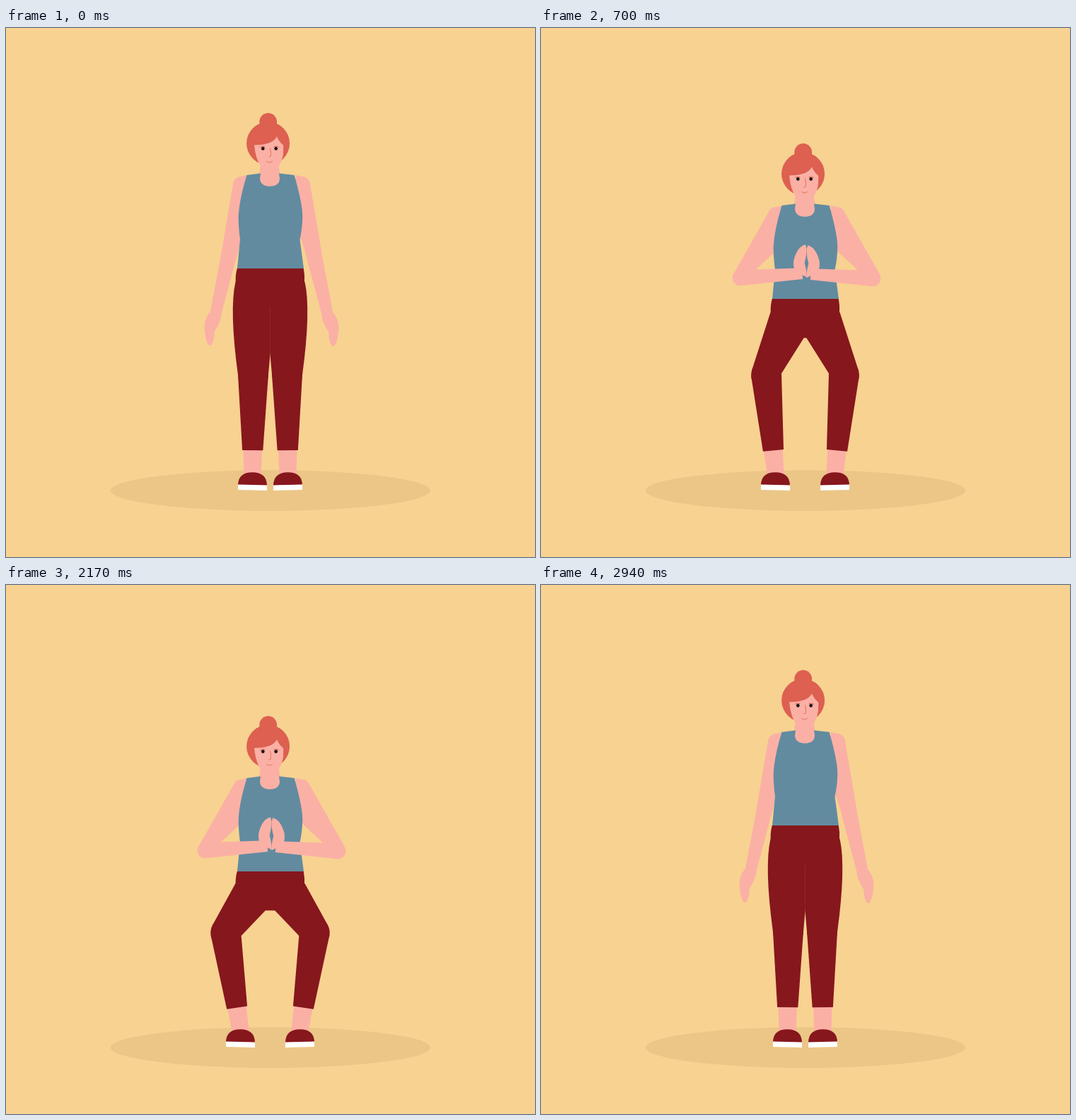
These frames come from a looping animation (748x748 px, 3430 ms). An HTML page:

```html
<!DOCTYPE html>
<html lang="en">
<head>
<meta charset="utf-8">
<title>Squat exercise</title>
<style>
  html, body { margin: 0; width: 100%; height: 100%; overflow: hidden; background: #f7d291; }
  svg { display: block; width: 100vw; height: 100vh; }
  .skin { fill: #fbb0a5; }
  .hair { fill: #dd6050; }
  .pants { fill: #86171d; }
  .line { fill: none; stroke: #dd6050; stroke-width: .8; stroke-linecap: round; }
</style>
</head>
<body>
<svg viewBox="0 0 748 748">
  <rect width="748" height="748" fill="#f7d291"/>
  <ellipse cx="374" cy="654" rx="226" ry="28.7" fill="#ebc687"/>

  <g id="upperBody">
    <g id="upperArm" class="skin">
      <path d="M342 208L333 210L326 214L335 232Z"/>
      <path id="upper" d="M-12 2A12 12 0 0 1 0 -12L20 -8L24 46L14 78L11 102L-11 102Z"/>
    </g>
    <use href="#upperArm" transform="matrix(-1 0 0 1 751 0)"/>
  </g>

  <g id="leg">
    <g id="shank">
      <path class="skin" d="M-13.2 -34H13.2L12 4H-12Z"/>
      <path class="pants" d="M-21.5 -140H21.5L14.6 -32.8H-14.6Z"/>
    </g>
    <circle id="knee" class="pants" r="21.5"/>
    <path id="thigh" class="pants"/>
    <g id="shoe">
      <path class="pants" d="M-20.5 646Q-20 628.3 0 628.3Q20 628.3 20.5 647Z"/>
      <path fill="#fff" d="M-20.5 645.4L20.5 646.4V654L-20.5 653Z"/>
    </g>
  </g>
  <use href="#leg" transform="matrix(-1 0 0 1 747 0)"/>

  <g id="front">
    <path class="pants" d="M327 339.5H420.7Q422.5 348 422 359L384 395.3H363L324.7 359Q324.3 348 327 339.5Z"/>
    <path class="skin" d="M360 190H385L388 210V226H358V210Z"/>
    <path fill="#628ba0" d="M340.5 208L360 205.5L359 213Q360 223.8 373 223.8Q386.500 223.8 387 213L386 205.500L407.700 208Q419 248 419.300 266Q419 284 415.500 299L421 340H327L331 299Q328.500 280 328.700 266Q330 242 340.500 208Z"/>
    <circle class="hair" cx="370.7" cy="132.7" r="12.4"/>
    <circle class="hair" cx="370.6" cy="163.2" r="30.5"/>
    <path class="skin" d="M351 165.500Q377 165.500 383 153.500Q386 161 392.300 166L392 178Q390 190 385 196H360.500Q353 186 351 165.500Z"/>
    <circle cx="363.3" cy="170.5" r="2.4" fill="#1c1512"/>
    <circle cx="381.700" cy="170.500" r="2.400" fill="#1c1512"/>
    <path class="line" d="M359 168.500Q362 165.800 366 167.500M379 167.500Q383 165.800 386 168.500M373.500 170Q375.500 179 374 181.500L372 182M368.500 188.700Q372.500 191.500 376.500 188.700"/>
    <g id="lowerArm" class="skin">
      <path id="forearm" d="M-11 0A11 11 0 0 1 11 0L7.800 88H-7.800Z"/>
      <circle id="elbow" r="11"/>
      <path id="hand"/>
    </g>
    <use href="#lowerArm" transform="matrix(-1 0 0 1 751 1)"/>
  </g>
</svg>
<script>
const STEP = 70, LOOP = 49, LAST = 14, HOLD_END = 28;

// Body drop and height of the inner thigh line for each step of the squat
const DROP = [0, -2, -5, -6, -4, -2.5, 0, 3, 7, 22, 43, 65, 86, 100, 106];
const CROTCH = [459, 455, 445, 435, 427, 423, 421, 421, 422, 426, 435, 453, 474, 492, 502];

// Hand outline hanging down, and folded in prayer (same local frame)
const HAND_DOWN = [-8, -5, -16, 6, -15, 18, -13, 41, -7, 42, -1, 38, -1, 22, 6, 12, 9, 0];
const HAND_FOLDED = [-7, -5, -7, 6, -4, 15, -9, 34, -5, 41, 6, 38, 11, 20, 13, 12, 9, 3];

const el = id => document.getElementById(id);
const move = (id, x, y, angle = 0) =>
  el(id).setAttribute('transform', `translate(${x} ${y}) rotate(${angle})`);
const clamp = v => Math.max(0, Math.min(1, v));
const smooth = v => { v = clamp(v); return v * v * (3 - 2 * v); };
const mix = (a, b, k) => a + (b - a) * k;
const rad = deg => deg * Math.PI / 180;
// Point at a distance from (x, y); angle 0 is down, positive turns left
const reach = (x, y, angle, dist) =>
  [x - Math.sin(rad(angle)) * dist, y + Math.cos(rad(angle)) * dist];

function drawArm(k) {
  const upperAngle = mix(10.2, 30.1, k), foreAngle = mix(12.8, -94, k);
  const [ex, ey] = reach(333, 222, upperAngle, 102);
  const [wx, wy] = reach(ex, ey, foreAngle, 87);
  move('upper', 333, 222, upperAngle);
  move('forearm', ex, ey, foreAngle);
  move('elbow', ex, ey);
  move('hand', wx, wy, -180 * k);
  const h = HAND_DOWN.map((v, i) => mix(v, HAND_FOLDED[i], k));
  el('hand').setAttribute('d', `M${h.slice(0, 2)}Q${h.slice(2)}Z`);
}

function drawLeg(k, drop, crotch) {
  const r = 21.5, footX = 348.5 - 17 * k;
  const tilt = Math.max(0, drop - 7) * .147 - .4 * (1 - k);
  const [kx, ky] = reach(footX, 630, 180 - tilt, 140);
  move('shoe', footX, 0);
  move('shank', footX, 630, -tilt);
  move('knee', kx, ky);

  // Outer thigh edge runs from the hip to its tangent on the knee
  const px = 324.5, py = 359 + drop - Math.max(0, drop - 43) * .09;
  const dist = Math.hypot(kx - px, ky - py);
  const slant = Math.atan2(px - kx, ky - py) + Math.asin(r / dist);
  const [tx, ty] = reach(px, py, slant * 180 / Math.PI, Math.sqrt(dist * dist - r * r));
  const bulge = (4 + 6 * (1 - k)) * clamp((43 - drop) / 36);
  const qx = mix(px, tx, .3) - bulge, qy = mix(py, ty, .3);

  // Inner corner slides down the shin as the knee bends
  const slide = 22 * clamp((drop - 43) / 63), c = Math.cos(rad(tilt)), s = Math.sin(rad(tilt));
  const side = r - slide * .064;
  const nx = kx + side * c + slide * s, ny = ky - side * s + slide * c;
  el('thigh').setAttribute('d',
    `M${px} ${py}Q${qx} ${qy} ${tx} ${ty}L${kx} ${ky}L${nx} ${ny}L373.7 ${crotch}V${350 + drop}Z`);
}

function draw(ms) {
  const tick = Math.floor(ms / STEP) % LOOP;
  const pose = tick <= HOLD_END ? Math.min(tick, LAST) : Math.max(0, HOLD_END + LAST - tick);
  const k = smooth(pose / 7), drop = DROP[pose];
  move('upperBody', 0, drop);
  move('front', 0, drop);
  drawArm(k);
  drawLeg(k, drop, CROTCH[pose]);
}

let start;
function frame(now) {
  start ??= now;
  draw(now - start);
  requestAnimationFrame(frame);
}
draw(0);
requestAnimationFrame(frame);
</script>
</body>
</html>
```
